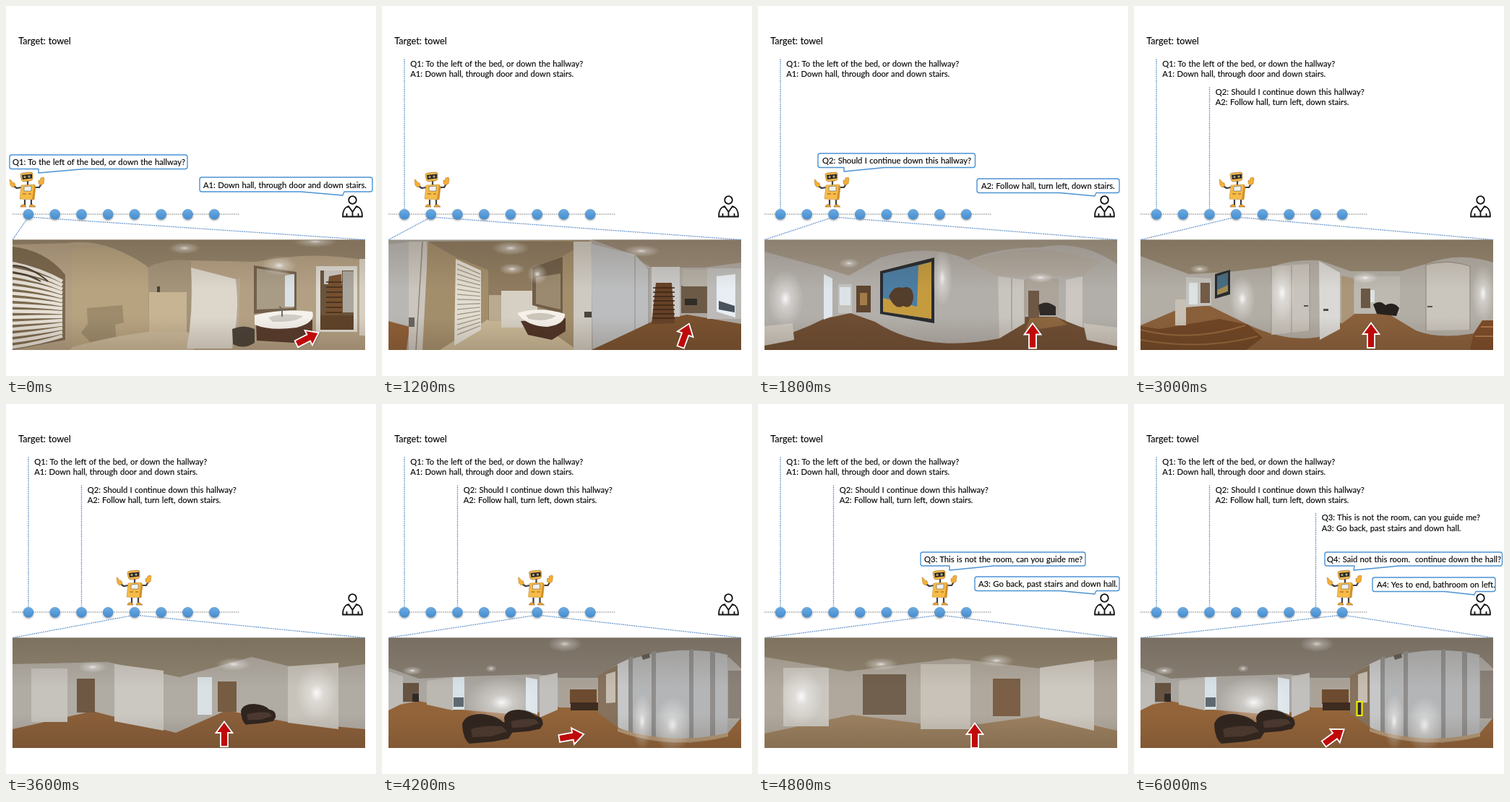
An HTML page that plays this animation: 512x512 px, repeating every 7200 ms.

```html
<!DOCTYPE html>
<html lang="en">
<head>
<meta charset="utf-8">
<title>Asking the way to the towel</title>
<style>
html, body { margin: 0; height: 100%; overflow: hidden; background: #fff; }
svg { display: block; width: 100vw; height: 100vh; }
text { font: 11.2px Lato, sans-serif; word-spacing: .55px; white-space: pre; fill: #000; stroke: #000; stroke-width: .12px; }
.title { font-size: 12.65px; }
.dots { fill: none; stroke: #3f78bd; stroke-width: 1.3; stroke-dasharray: 1.3 1.3; }
.axis { stroke: #666; stroke-width: 1; }
.bubble { fill: #fff; stroke: #4b93d3; stroke-width: 1.4; stroke-linejoin: round; }
</style>
</head>
<body>
<svg id="stage" viewBox="0 0 512 512">
<defs>
  <radialGradient id="glow"><stop stop-color="#fff" stop-opacity=".9"/><stop offset=".3" stop-color="#fff" stop-opacity=".4"/><stop offset="1" stop-color="#fff" stop-opacity="0"/></radialGradient>
  <linearGradient id="shade" x2="0" y2="1"><stop stop-color="#3c2d1c" stop-opacity=".2"/><stop offset=".45" stop-color="#3c2d1c" stop-opacity="0"/><stop offset=".7" stop-color="#3c2d1c" stop-opacity="0"/><stop offset="1" stop-color="#3c2d1c" stop-opacity=".2"/></linearGradient>
  <linearGradient id="ball" x2="0" y2="1"><stop stop-color="#6cabe3"/><stop offset="1" stop-color="#458ccd"/></linearGradient>
  <filter id="soft" x="-50%" y="-50%" width="200%" height="200%"><feGaussianBlur stdDeviation="1.1"/></filter>
  <clipPath id="view"><path d="M9 323.500H497V476H9Z"/></clipPath>
  <g id="robot">
    <path d="M-8 21L-14 22L-20 18M11 21L17 21L20 16M-3 38V46M6 38V46M1 11V18" fill="none" stroke="#3d3f45" stroke-width="2.200"/>
    <path d="M-24 10L-22 11L-20 14L-17 15L-16 19L-20 21L-23 18ZM16 11L18 12L19 8L23 7L24 9L23 16L18 18L16 15Z" fill="#f6ae36" stroke="#a8741d" stroke-width=".5"/>
    <path d="M-9 3Q-8 1 -5 1L5 0Q8 0 8 3L8 9Q7 12 4 12L-5 13Q-8 12 -8 9Z" fill="#f5b748" stroke="#8b6427" stroke-width=".6"/>
    <path d="M-7 4L7 2.500L7 8.500L-6 10Z" fill="#24272d"/>
    <circle cx="-3" cy="6.600" r="1.700" fill="#b9a56b"/><circle cx="3" cy="6" r="1.700" fill="#b9a56b"/>
    <path d="M-8 18L10 17L12 20L10 38L-10 37Z" fill="#f7bb48" stroke="#b9822a" stroke-width=".5"/>
    <path d="M10 17L12 20L10 38L7 38Z" fill="#d0902d"/>
    <path d="M-4 20L6 19L6 26L-4 26Z" fill="#eef2f2" stroke="#6d6047" stroke-width=".6"/>
    <path d="M-6 30H-1M2 30H6" stroke="#8a5c14"/>
    <path d="M-9 48Q-8 44 -3 45L-1 48ZM3 48Q4 44 8 45L12 48Z" fill="#f4aa34" stroke="#80540f" stroke-width=".6"/>
  </g>
  <g id="arrow">
    <path d="M-17 -5H2V-12L18 0L2 12V5H-17Z" fill="#444" opacity=".45" filter="url(#soft)" transform="translate(1 1)"/>
    <path d="M-17 -5H2V-11.500L17.500 0L2 11.500V5H-17Z" fill="#c00a0a" stroke="#fff" stroke-width="1.800"/>
  </g>
  <g id="armchair">
    <path d="M0 14Q4 0 26 0Q48 2 56 11Q69 12 69 26L64 34L44 38L10 41Q1 35 0 14Z" fill="#30241f"/>
    <path d="M12 21Q30 15 55 17L62 24L40 31L14 32Z" fill="#4b3830"/>
  </g>
</defs>
</svg>
<script>
const LOOP = 7200, ROW = 288;
const nodeX = i => 31 + i * 36.75;
const path = (fill, d) => `<path fill="${fill}" d="${d}"/>`;
const stroke = (color, width, d) => `<path fill="none" stroke="${color}" stroke-width="${width}" d="${d}"/>`;
const glow = (x, y, rx, ry = rx) => `<ellipse cx="${x}" cy="${y}" rx="${rx}" ry="${ry}" fill="url(#glow)"/>`;
const box = (fill, x, y, right, bottom) => path(fill, `M${x} ${y}H${right}V${bottom}H${x}Z`);
const text = (x, y, s, cls = "") => `<text x="${x}" y="${y}" class="${cls}">${s}</text>`;
const use = (id, x, y, turn = 0, scale = 1) => `<use href="#${id}" transform="translate(${x} ${y}) rotate(${turn}) scale(${scale})"/>`;
const repeat = (n, f) => Array.from({ length: n }, (_, i) => f(i)).join("");

const talks = [
  { node: 0, y: 83.5, q: "Q1: To the left of the bed, or down the hallway?", a: "A1: Down hall, through door and down stairs." },
  { node: 2, y: 122.5, q: "Q2: Should I continue down this hallway?", a: "A2: Follow hall, turn left, down stairs." },
  { node: 6, y: 161.2, q: "Q3: This is not the room, can you guide me?", a: "A3: Go back, past stairs and down hall." },
  { q: "Q4: Said not this room.  continue down the hall?", a: "A4: Yes to end, bathroom on left." }
];

function bubble(x, y, right, bottom, textX, s, baseL, baseR, tipX, tipY) {
  return `<path class="bubble" d="M${x + 3} ${y}H${right - 3}q3 0 3 3V${bottom - 3}q0 3 -3 3H${baseR}L${tipX} ${tipY}L${baseL} ${bottom}H${x + 3}q-3 0 -3 -3V${y + 3}q0 -3 3 -3Z"/>`
    + text(textX, bottom - 5.3, s);
}

// Panoramas: flat shapes in the main tones of each room.
const bathroom = () =>
  box("#b3a084", 9, 323, 497, 476) +
  path("#92826a", "M9 323H497V352Q425 338 345 354L255 352Q220 350 196 362Q140 320 85 328L9 330Z") +
  path("#7b684e", "M9 333Q55 338 82 372V462L9 476Z") +
  repeat(15, i => stroke("#e6e0d6", 4.6, `M9 ${356 + i * 8.3}Q48 ${364 + i * 7.3} 78 ${381 + i * 5.4}`)) +
  stroke("#453b31", 2, "M10 359Q34 360 58 381M10 369Q30 371 48 381") +
  path("#b7a380", "M92 340Q145 323 195 360L198 455Q140 462 92 472Z") +
  path("#9d8b6c", "M112 418L161 414L163 438L151 441L153 464L126 475L104 452L113 440Z") +
  path("#a4947a", "M197 361Q230 347 256 353V453H198Z") +
  box("#c6b493", 198, 396, 250, 451) + box("#4b4136", 209, 388, 213, 396) +
  path("#cab89a", "M92 472Q150 456 198 451H252L260 476H88Z") +
  path("#ddd6cb", "M256 362L318 378Q325 425 313 474H250Q260 420 256 362Z") +
  path("#b6a995", "M318 378L324 376L322 448L312 474Q324 425 318 378Z") +
  path("#71604c", "M343 359L402 368V421L343 426Z") + path("#a99c86", "M347 363L398 371V418L347 420Z") +
  path("#dbe2e5", "M386 373L399 371V416H386Z") +
  path("#4a4037", "M313 447Q329 440 344 447V466Q329 476 314 468Z") +
  path("#563a2b", "M346 438L424 434V454L398 466L347 463Z") +
  path("#f5f2ed", "M344 428Q382 418 424 423Q429 438 402 445Q366 450 344 441Z") +
  path("#cfccc5", "M363 431Q384 423 411 429Q402 438 369 437Z") + stroke("#6f6b66", 2, "M382 430V419L378 416") +
  box("#dcd8d0", 429, 360, 486, 451) + box("#69543d", 435, 366, 481, 448) + box("#cbc7c1", 440, 366, 465, 385) +
  path("#75502f", "M447 374L464 371L466 427L441 427Z") +
  repeat(7, i => stroke("#3f2b1b", 1.3, `M443 ${382 + i * 7}H465`)) +
  box("#aaa59d", 466, 367, 481, 424) + path("#5e4229", "M435 428H481V448H435Z") +
  box("#d6d0c4", 489, 350, 497, 456) +
  glow(247, 335, 22, 8) + glow(378, 359, 24, 14) + glow(428, 326, 30, 8);

const landing = () =>
  box("#aca7a0", 9, 323, 497, 476) +
  path("#b9b7b4", "M9 330L39 326V443L9 437Z") + path("#8e5e36", "M9 436L38 444L34 476H9Z") +
  box("#cac5bd", 37, 326, 62, 476) + stroke("#8c8173", 1.4, "M56 326L47 476") + box("#69645d", 37, 431, 45, 444) +
  path("#a38e6c", "M64 326L287 324V476H56Z") +
  path("#8d7b61", "M64 326H287L248 347L204 365H147L103 348Z") +
  path("#c9b897", "M80 476L146 434H210L270 476Z") +
  path("#8f7b5f", "M147 365H207V435H147Z") + box("#d6cfc4", 165, 394, 215, 445) + box("#b9aa91", 148, 400, 165, 436) +
  path("#e2ddd3", "M102 350L137 366V448L100 470Z") +
  repeat(15, i => stroke("#a79b87", 1.4, `M104 ${357 + i * 7}L136 ${371 + i * 5.1}`)) +
  path("#6f5e49", "M208 362L250 347V426L208 414Z") + path("#9c8a70", "M213 376L247 370V420L213 412Z") +
  path("#4d3325", "M192 436L254 432V450L235 462L202 455Z") +
  path("#f5f1ea", "M187 425Q218 415 253 426Q254 440 229 444Q200 443 187 425Z") + path("#cbc5ba", "M199 428Q220 421 241 429Q227 438 203 433Z") +
  box("#cec9c1", 265, 326, 290, 476) + box("#4b443c", 280, 423, 290, 431) +
  path("#978876", "M290 323H497V355L445 362H373L336 340Z") +
  path("#bcbdbe", "M289 329L350 344L369 365V444L292 474Z") + stroke("#908d88", 1, "M350 345V451M369 363V442") +
  path("#79512f", "M290 476L373 437L422 427L497 440V476Z") +
  path("#cac9c7", "M373 361H412V430H373Z") + path("#664127", "M379 383H401L405 439L373 440Z") +
  repeat(8, i => stroke("#3a2415", 1.4, `M375 ${390 + i * 6}H405`)) +
  box("#6d5a46", 414, 387, 450, 425) + box("#b5afa5", 416, 365, 450, 388) + box("#302c28", 419, 405, 436, 414) +
  box("#bcbbb9", 450, 363, 497, 433) + path("#e8eef3", "M463 374L489 371V431L463 423Z") + path("#49535b", "M466 408L488 415V424L466 420Z") +
  glow(178, 335, 26, 10) + glow(215, 371, 14) + glow(359, 339, 26, 8) + glow(180, 364, 18, 8);

const gallery = () =>
  box("#b2aea9", 9, 323, 497, 476) +
  path("#a09586", "M9 323H497V357Q445 322 390 334Q330 334 291 352Q240 327 170 348L126 373L90 362L9 340Z") +
  path("#6e4d33", "M9 463Q55 452 91 433L128 425L162 437Q230 481 334 460L370 430H412L450 445L497 468V476H9Z") +
  path("#b1aaa0", "M290 354Q380 320 474 354L449 374H332Z") +
  path("#dfe7ed", "M91 371L103 377V429L91 434Z") + box("#c4c2be", 111, 385, 130, 425) + box("#dce3e8", 113, 389, 128, 414) +
  box("#5d452f", 136, 387, 156, 424) + box("#a27c48", 141, 397, 151, 414) +
  path("#292b2f", "M169 367L244 348V439L169 426Z") + path("#4c7da3", "M173 370L240 354V433L173 423Z") +
  path("#c59b40", "M222 359L240 354V433L173 423V404L220 416Z") +
  path("#533d2b", "M181 402Q187 386 200 390Q214 385 215 403Q213 421 201 415Q190 422 181 402Z") +
  path("#c8c4be", "M332 374L369 379V439L334 460Z") + stroke("#928a7f", 1, "M351 377V448M369 379V439") +
  box("#ada49a", 370, 377, 416, 427) + box("#6d5745", 374, 394, 389, 432) + path("#2f2a27", "M388 414Q399 406 412 416V428H390Z") +
  path("#8c663f", "M376 432L413 430L428 441L370 450Z") + path("#ccc8c1", "M426 379L449 374V445L426 436Z") +
  path("#cbc6bd", "M9 443L48 439L50 462L9 470Z") + path("#cbc6bd", "M450 439L497 445V471L455 462Z") +
  glow(126, 356, 14, 7) + glow(391, 376, 18, 7) + glow(255, 376, 14, 40) + glow(38, 405, 25, 40);

const doors = () =>
  box("#b2ada5", 9, 323, 497, 476) +
  path("#93856f", "M9 323H497V355Q450 339 404 357L368 367H300L257 352Q220 350 190 361L132 368L76 371L9 346Z") +
  path("#8a603b", "M9 442L72 415L105 415L156 440Q210 466 256 458L305 426H352L390 449Q430 465 497 447V476H9Z") +
  path("#704625", "M9 443L35 447L118 433L158 441L178 459L155 476H9Z") + stroke("#95653b", 2, "M9 448Q80 466 154 442M9 462Q96 477 171 457") +
  path("#c4c2be", "M72 375L107 377V414L72 417Z") + box("#725c47", 92, 383, 105, 411) + box("#dde2e4", 76, 383, 88, 413) +
  path("#272b30", "M112 371L133 365V399L112 405Z") + path("#a28a50", "M115 374L130 369V395L115 400Z") + path("#496c82", "M115 374L130 369V386L115 393Z") +
  box("#c8c0b4", 57, 406, 72, 442) +
  path("#c8c3bc", "M190 360L243 357V449L190 455Z") + stroke("#9d9486", 1, "M190 360V455M218 359V452M243 357V449") + box("#57514a", 235, 414, 241, 416) +
  path("#dbd9d5", "M256 353L285 369V447L257 462Z") + box("#514b45", 262, 419, 269, 422) +
  path("#ab967a", "M287 373L304 377V427L287 440Z") + box("#bdb8b0", 305, 374, 368, 425) + box("#6b5844", 314, 391, 327, 418) + box("#dce2e5", 327, 393, 333, 410) +
  path("#27211d", "M331 413Q340 406 348 414Q359 408 367 418L363 429L336 426Z") +
  path("#cac5bd", "M404 358Q435 350 465 360V448L404 449Z") + stroke("#988f82", 1.2, "M404 450V358Q435 350 465 360V448") + box("#57514a", 406, 415, 413, 417) +
  path("#7b4b28", "M470 453L482 435H497V476H465Z") + stroke("#ad7549", 2, "M480 444H497M472 457H497") +
  glow(91, 364, 14, 6) + glow(320, 376, 18, 8) + glow(205, 397, 18, 40) + glow(483, 398, 16, 40) + glow(150, 405, 18, 32);

const lounge = () =>
  box("#aaa6a0", 9, 323, 497, 476) +
  path("#877e73", "M9 323H497V366L481 351Q400 330 326 360L298 379H247L215 374L114 377L51 380L9 365Z") +
  path("#93643a", "M9 419L51 411L98 422L200 431L245 419H298L327 447Q400 480 479 455L497 434V476H9Z") +
  path("#bfbcb8", "M9 370L29 377V414L9 424Z") + box("#665342", 29, 386, 51, 412) + box("#2f2924", 42, 401, 51, 412) +
  path("#bbb7b1", "M62 383L98 378V424L62 416Z") + box("#d7e1e8", 98, 378, 114, 423) + box("#5f6972", 99, 406, 113, 419) +
  path("#dbe4e9", "M199 378L215 381V430L199 423Z") + path("#c2c0bd", "M218 377L243 372V423L218 434Z") +
  box("#aaa297", 245, 381, 298, 420) + box("#6d4b30", 260, 395, 297, 415) + box("#3d2b1f", 261, 413, 299, 424) +
  path("#86725d", "M299 376L326 361V448L299 427Z") + path("#c6beb2", "M310 374L323 370V413L310 414Z") +
  path("#b4b5b6", "M326 360Q402 330 478 347V459Q402 478 327 448Z") +
  path("#c6c7c8", "M326 360L341 353V453L327 448Z") +
  path("#8f8e8d", "M341 352L347 348V456L341 453ZM373 343L379 341V466L373 464ZM425 340L431 339V468L425 469ZM454 343L461 344V462L454 464Z") +
  path("#b69a78", "M326 449Q402 473 479 455V460Q400 480 326 453Z") + box("#8a8179", 479, 369, 497, 435) +
  path("#625c54", "M359 348L370 345L371 351L361 354Z") +
  glow(166, 413, 52, 36) + glow(253, 332, 24, 11) + glow(151, 366, 8, 5) + glow(42, 369, 14, 6) + glow(360, 440, 14, 40) + glow(402, 445, 26, 40) +
  use("armchair", 169, 423, 0, .78) + use("armchair", 111, 429);

const hall = () =>
  box("#b0aba3", 9, 323, 497, 476) +
  path("#8d826f", "M9 323H497V360L420 370L340 350L240 378L140 357L9 360Z") +
  path("#8a5f3a", "M9 450L120 425L235 455L305 424L390 440L497 450V476H9Z") +
  box("#c6c2bc", 35, 366, 85, 440) + box("#6f5843", 98, 380, 123, 427) + path("#cbc7c1", "M150 360L218 369V452L150 439Z") +
  box("#d9e1e5", 265, 378, 285, 430) + box("#755c42", 293, 384, 319, 426) + path("#c7c2ba", "M390 363L460 358V450L390 441Z") +
  glow(120, 364, 20, 8) + glow(315, 360, 24, 9) + glow(430, 400, 30, 40) + use("armchair", 325, 415, 0, .7);

const washroom = () =>
  box("#b0a89d", 9, 323, 497, 476) + path("#8f836f", "M9 323H497V353L390 366L270 352L125 370L9 350Z") +
  path("#9b8060", "M9 456L130 430L270 448L400 430L497 452V476H9Z") +
  box("#cbc7c0", 35, 365, 98, 446) + box("#71604d", 145, 374, 205, 430) + box("#c8c2b8", 225, 360, 294, 450) +
  path("#cdc8c0", "M390 365L465 354V452L390 434Z") + box("#7b6047", 325, 380, 363, 432) +
  glow(170, 360, 24, 9) + glow(330, 355, 25, 9) + glow(60, 405, 30, 40);

const towelBox = `<path d="M308.500 412H315.500V431H308.500Z" fill="#302c29" stroke="#f6ea00" stroke-width="2.200"/>`;

const scenes = [
  { at: 0, node: 0, robot: 29, past: 0, room: bathroom, arrow: [417, 460, -27], says:
    bubble(5, 206, 251, 225.5, 9, talks[0].q, 45, 108, 45, 231) + bubble(268, 237, 507, 257, 273, talks[0].a, 408, 468, 466, 262) },
  { at: 1200, node: 1, robot: 69, past: 1, room: landing, arrow: [419, 456, -70] },
  { at: 1800, node: 2, robot: 102, past: 1, room: gallery, arrow: [380, 456.5, -90], says:
    bubble(83, 204, 300.5, 223.5, 89, talks[1].q, 119, 175, 119, 229) + bubble(303, 239, 500, 258.5, 309, talks[1].a, 418, 468, 466, 263) },
  { at: 3000, node: 3, robot: 142, past: 2, room: doors, arrow: [328, 456, -90] },
  { at: 3600, node: 4, robot: 177, past: 2, room: hall, arrow: [302, 457, -90] },
  { at: 4200, node: 5, robot: 212.5, past: 2, room: lounge, arrow: [262, 460, -10] },
  { at: 4800, node: 6, robot: 251, past: 2, room: washroom, arrow: [300, 459, -90], says:
    bubble(225, 205, 453, 224, 230, talks[2].q, 265, 326, 265, 230) + bubble(300, 239, 500, 258.5, 305, talks[2].a, 418, 468, 466, 263) },
  { at: 6000, node: 7, robot: 291, past: 3, room: lounge, arrow: [276.5, 460.5, -36], extra: towelBox, says:
    bubble(264, 205, 509.5, 224, 267, talks[3].q, 305, 367, 304, 230) + bubble(330, 240, 500, 259.5, 336, talks[3].a, 430, 473, 471, 264) }
];

const history = ({ node, y, q, a }) =>
  `<path class="dots" d="M${nodeX(node)} ${y - 10}V${ROW}"/>` + text(nodeX(node) + 8.3, y, q) + text(nodeX(node) + 8.3, y + 14.7, a);

const balls = repeat(8, i =>
  `<circle cx="${nodeX(i)}" cy="${ROW + 1.8}" r="7.3" fill="#777" opacity=".6" filter="url(#soft)"/>` +
  `<circle cx="${nodeX(i)}" cy="${ROW + .3}" r="7" fill="url(#ball)" stroke="#4a8ccb" stroke-width=".5"/>`);

const person = `<g fill="none" stroke="#111" stroke-width="1.800" stroke-linejoin="round">
  <circle cx="479.500" cy="268.500" r="5.300"/>
  <path d="M466 291.500Q466 279 474 277L479.500 285L485 277Q493 279 493 291.500ZM471.500 291V287M487.500 291V287M479.500 285V291"/></g>`;

const drawScene = s => `<g class="scene" visibility="hidden">
  <g clip-path="url(#view)">${s.room()}${box("url(#shade)", 9, 323, 497, 476)}</g>
  ${s.extra || ""}${use("arrow", ...s.arrow)}
  ${talks.slice(0, s.past).map(history).join("")}
  <path class="dots" d="M${nodeX(s.node)} 292L9 323.500M${nodeX(s.node)} 292L497 323.500"/>
  ${balls}${s.says || ""}${use("robot", s.robot, 230)}</g>`;

const stage = document.getElementById("stage");
stage.insertAdjacentHTML("beforeend",
  text(17.3, 52.8, "Target: towel", "title") + `<path class="dots axis" d="M9 ${ROW}H323"/>` +
  scenes.map(drawScene).join("") + person);

const groups = [...stage.querySelectorAll(".scene")];
function render() {
  const t = performance.now() % LOOP;
  const current = scenes.findLastIndex(s => s.at <= t);
  groups.forEach((g, i) => g.setAttribute("visibility", i === current ? "visible" : "hidden"));
  requestAnimationFrame(render);
}
render();
</script>
</body>
</html>
```
